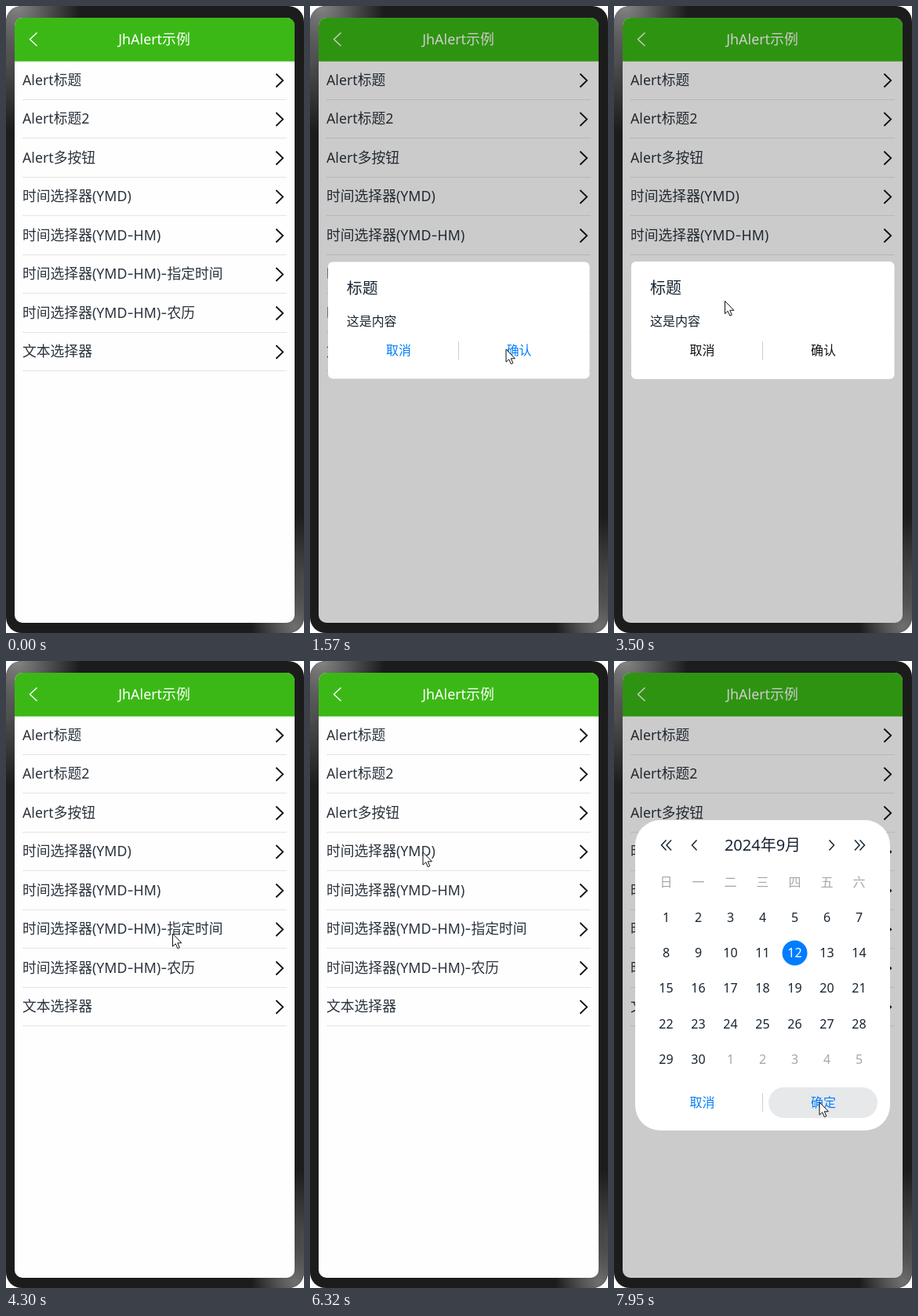
An HTML page that plays this animation: 380x800 px, repeating every 8000 ms.

```html
<!DOCTYPE html>
<html lang="zh-CN">
<head>
<meta charset="utf-8">
<title>JhAlert示例</title>
<style>
  html, body { margin: 0; width: 100%; height: 100%; overflow: hidden; background: #fff; }
  svg { display: block; font-family: "Noto Sans", "Noto Sans CJK SC", "Noto Sans CJK", sans-serif; }
  .dash { font-family: Inter, sans-serif; }
  .line { fill: none; stroke-linejoin: miter; }
</style>
</head>
<body>
<svg id="stage" width="380" height="800" viewBox="0 0 380 800"></svg>
<script>
const LOOP = 8000;
const BLUE = '#007dff', INK = '#182431', GREY = '#a3a7ad';

// ---- drawing helpers ----
const text = (str, x, y, { size = 17.8, fill = '#2b333d', anchor = 'start', weight = 400 } = {}) =>
  `<text x="${x}" y="${y + size * 0.36}" font-size="${size}" fill="${fill}" text-anchor="${anchor}" font-weight="${weight}">${
    str.replace(/-/g, '<tspan class="dash">-</tspan>')}</text>`;

const centered = (str, x, y, size, fill, weight) =>
  text(str, x, y, { size, fill, weight, anchor: 'middle' });

const rect = (x, y, w, h, fill, r = 0, extra = '') =>
  `<rect x="${x}" y="${y}" width="${w}" height="${h}" rx="${r}" fill="${fill}" ${extra}/>`;

// Chevron with its tip at (x, y); dx and dy reach to the open ends.
const chevron = (x, y, dx, dy, color, width) =>
  `<path class="line" d="M${x + dx} ${y - dy}L${x} ${y}L${x + dx} ${y + dy}" stroke="${color}" stroke-width="${width}"/>`;

// ---- page ----
const rows = ['Alert标题', 'Alert标题2', 'Alert多按钮', '时间选择器(YMD)', '时间选择器(YMD-HM)',
  '时间选择器(YMD-HM)-指定时间', '时间选择器(YMD-HM)-农历', '文本选择器'];

const glow = (id, cx, cy, r, inner) => `
  <radialGradient id="${id}" gradientUnits="userSpaceOnUse" cx="${cx}" cy="${cy}" r="${r}">
    <stop offset="0" stop-color="${inner}"/><stop offset="1" stop-color="${inner}" stop-opacity="0"/>
  </radialGradient>`;

const phone = `
  <defs>
    ${glow('glowTop', 14, 0, 80, '#858585')}
    ${glow('glowLeft', 0, 75, 85, '#4c4c4c')}
    ${glow('glowBottom', 368, 792, 55, '#707070')}
    ${glow('glowRight', 380, 735, 85, '#4c4c4c')}
    <clipPath id="body">${rect(0, 0, 380, 800, '#000', 20)}</clipPath>
    <clipPath id="screen">${rect(11, 15, 357, 772, '#000', 10)}</clipPath>
  </defs>
  <g clip-path="url(#body)">
    ${['#1c1c1c', 'url(#glowLeft)', 'url(#glowTop)', 'url(#glowRight)', 'url(#glowBottom)']
      .map(fill => rect(0, 0, 380, 800, fill)).join('')}
  </g>`;

const page = rect(11, 15, 358, 773, '#fefefe') + rect(11, 15, 358, 55.7, '#3bb816')
  + chevron(30.5, 42.5, 9, 8.5, '#fff', 1.4)
  + centered('JhAlert示例', 189, 42.5, 17.9, '#fff')
  + rows.map((label, i) => {
      const y = 94.5 + 49.5 * i;
      return text(label, 21, y) + chevron(353.2, y + 0.5, -8.8, 8.5, '#111', 1.8)
        + rect(21, Math.floor(119 + 49.5 * i), 337, 1, '#e4e4e4');
    }).join('');

// ---- dialogs ----
const divider = (y, h) => rect(189, y, 1, h, '#d0d0d0');

const alertBox = (top, height, content, buttons) =>
  rect(22, top, 335.5, height, '#fff', 6)
  + text('标题', 46, top + 33.5, { size: 20, fill: INK, weight: 500 })
  + text(content, 46, top + 76.5, { size: 16, fill: INK })
  + buttons;

const pairButtons = color => centered('取消', 112.5, 439.5, 16, color, 500)
  + centered('确认', 267, 439.5, 16, color, 500) + divider(428, 24);

const stackedButtons = ['取消', '确认', '确认二']
  .map((label, i) => centered(label, 189.5, 396 + 43.5 * i, 16, BLUE, 500)).join('');

function calendar() {
  const colX = i => 66.5 + 41 * (i % 7);
  let out = rect(27, 203, 325, 396, '#fff', 32)
    + centered('2024年9月', 189.5, 235, 20, INK, 500)
    + [[60.5, 6], [67, 6], [99.5, 6], [280.5, -6], [313, -6], [319.5, -6]]
        .map(([x, dx]) => chevron(x, 235, dx, 6.5, INK, 1.5)).join('')
    + [...'日一二三四五六'].map((day, i) => centered(day, colX(i), 282, 16, GREY)).join('')
    + `<circle cx="230.5" cy="372.5" r="16" fill="${BLUE}"/>`;
  for (let i = 0; i < 35; i++) {
    const fill = i >= 30 ? GREY : i === 11 ? '#fff' : INK;
    out += centered(String(i % 30 + 1), colX(i), 327.5 + 45.1 * Math.floor(i / 7), 16, fill, i < 30 ? 500 : 400);
  }
  return out + divider(551, 24)
    + rect(197, 544, 139, 39, '#e7e8ea', 19.5, 'id="pressed"')
    + centered('取消', 112.5, 563, 16, BLUE, 500) + centered('确定', 267, 563, 16, BLUE, 500);
}

const dialogs = [
  { open: 1000, close: 1700, scale: 0.994, art: alertBox(326, 150, '这是内容', pairButtons(BLUE)) },
  { open: 3370, close: 4050, scale: 1, art: alertBox(326, 150, '这是内容', pairButtons('#111')) },
  { open: 4790, close: 5450, scale: 1, art: alertBox(282.5, 237, '内容', stackedButtons) },
  { open: 7050, close: 9000, scale: 1, art: calendar() },
];

// ---- pointer: [start, end, x, y], each move begins where the last one ended ----
const moves = [
  [0, 0, 222, 475],
  [120, 620, 88, 97],
  [1060, 1540, 250, 438],
  [1840, 2460, 143.5, 144.5],
  [3390, 3500, 141.5, 376.5],
  [3500, 3900, 252, 436],
  [4150, 4520, 143.5, 194],
  [4810, 4950, 241.5, 463.5],
  [4950, 5170, 198, 476],
  [5600, 6260, 144, 244],
  [7120, 7600, 262, 563],
];

const stage = document.getElementById('stage');
stage.innerHTML = phone + `<g clip-path="url(#screen)">${page}
    ${rect(11, 15, 358, 773, '#000', 0, 'id="mask"')}
    ${dialogs.map(d => `<g class="dialog">${d.art}</g>`).join('')}
    <path id="pointer" d="M0 0V16.2L3.7 12.8L6.3 18.7L8.8 17.6L6.3 11.8H11.4Z"
      fill="#fff" stroke="#111" stroke-width="1"/></g>`;

const mask = document.getElementById('mask');
const pointer = document.getElementById('pointer');
const pressed = document.getElementById('pressed');
const dialogNodes = [...document.querySelectorAll('.dialog')];

const progress = (t, a, b) => b > a ? Math.min(1, Math.max(0, (t - a) / (b - a))) : +(t >= a);
const smooth = p => p * p * (3 - 2 * p);
const easeOut = p => 1 - (1 - p) ** 3;

function draw(t) {
  let shade = 0;
  dialogs.forEach((d, i) => {
    const shown = easeOut(progress(t, d.open, d.open + 130));
    const alpha = shown * (1 - smooth(progress(t, d.close, d.close + 200)));
    const scale = d.scale * (0.9 + 0.1 * shown);
    const node = dialogNodes[i];
    node.style.display = alpha > 0 ? '' : 'none';
    node.setAttribute('opacity', alpha);
    node.setAttribute('transform', `translate(189.7 401) scale(${scale}) translate(-189.7 -401)`);
    shade = Math.max(shade, alpha);
  });
  mask.setAttribute('opacity', 0.2 * shade);
  pressed.setAttribute('opacity', progress(t, 7830, 7940));

  let x = 0, y = 0;
  for (const [start, end, toX, toY] of moves) {
    const p = smooth(progress(t, start, end));
    x += (toX - x) * p;
    y += (toY - y) * p;
  }
  pointer.setAttribute('transform', `translate(${x} ${y})`);
  pointer.style.display = t < 120 ? 'none' : '';
}

const began = performance.now();
function tick() {
  draw((performance.now() - began) % LOOP);
  requestAnimationFrame(tick);
}
tick();
</script>
</body>
</html>
```
